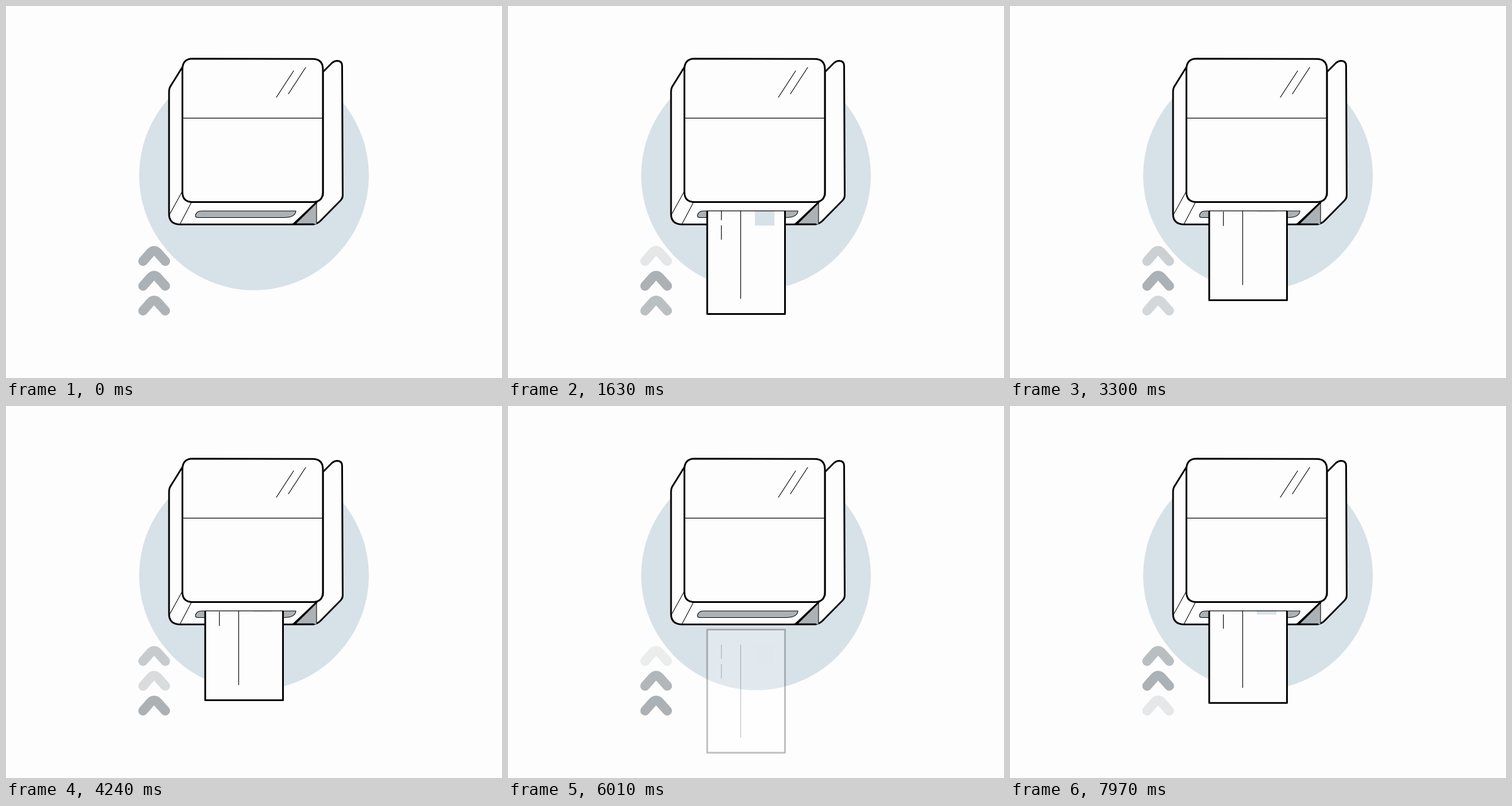
An HTML page with a canvas for the animation above (8 s loop, 864 by 648 pixels).

```html
<!DOCTYPE html>
<html lang="en">
<head>
<meta charset="utf-8">
<title>Paper feed</title>
<style>
  html, body { margin: 0; width: 100%; height: 100%; overflow: hidden; background: #fdfdfd; }
  canvas { display: block; }
</style>
</head>
<body>
<canvas id="stage" width="864" height="648"></canvas>
<script>
const ctx = document.getElementById('stage').getContext('2d');
const LOOP = 8000;
const WHITE = '#fdfdfd', BLACK = '#000', GRAY = '#abb1b4', BLUE = '#d7e1e8';

const FEED = { cycle: 5860, start: 761, span: 1725, from: 604, to: 512.6 };
const PULSE = { period: 1520, half: 562, first: 493, low: 0.2 };

const clamp = v => Math.min(1, Math.max(0, v));
const smooth = v => v * v * (3 - 2 * v);

// Cubic bezier easing with handles (x1, 0) and (x2, 1).
function ease(x, x1, x2) {
  let lo = 0, hi = 1;
  for (let i = 0; i < 24; i++) {
    const s = (lo + hi) / 2, r = 1 - s;
    if (3 * x1 * s * r * r + 3 * x2 * s * s * r + s * s * s < x) lo = s;
    else hi = s;
  }
  return smooth(lo);
}

function shape(d, fill, stroke, width) {
  const path = new Path2D(d);
  if (fill) { ctx.fillStyle = fill; ctx.fill(path); }
  if (stroke) { ctx.strokeStyle = stroke; ctx.lineWidth = width; ctx.stroke(path); }
}
const line = (d, width) => shape(d, null, BLACK, width);

function drawMachine() {
  // right panel
  shape('M552 115 L568 99 Q572 95.5 577 95.5 Q585.5 96 585.5 104 L586.5 330 Q586.5 335 583 338.5 ' +
    'L547.5 374.5 Q542 380 534 380 L500 380 L552 330 Z', WHITE, BLACK, 3);
  // body: left side and underside
  shape('M307.5 106 L287 139 Q284 143 284 150 L284 362 Q284 380 303 380.5 L500 380.5 ' +
    'L541 342 L541 110 Z', WHITE, BLACK, 3);
  shape('M541 342 L541 380 L502 380 Z', GRAY);
  line('M541 341 V379', 1.1);
  line('M541 342 L503 379.5 M498 380.3 H536', 3);
  line('M307 323 L285 363 M323 342 L303 380', 1.1);
  // slot
  shape('M341 357 H505 Q504 368.5 484 368.5 H335 Q330 368.5 330 365.5 Q331 357 341 357 Z',
    GRAY, BLACK, 1.1);
  // front face
  shape('M325 91.7 L534 92.3 Q552 92.5 552 110 L552 324 Q552 341.5 534 341.5 L325 341.5 ' +
    'Q307.3 341.5 307.3 324 L307.3 109 Q308 92 325 91.7 Z', WHITE, BLACK, 3);
  line('M308 195.4 H551', 1.1);
  line('M501 113 L471 159 M522 107 L492 153', 1.2);
}

function drawPaper(t) {
  const u = t % FEED.cycle;
  const alpha = clamp((u - 60) / 360) * clamp((5660 - u) / 360);
  if (alpha <= 0) return;
  const p = ease(clamp((u - FEED.start) / FEED.span), 0.05, 0.45);
  const bottom = FEED.from + (FEED.to - FEED.from) * p;

  ctx.save();
  ctx.globalAlpha = alpha;
  ctx.beginPath();
  ctx.rect(330, 357, 170, 291);
  ctx.clip();
  ctx.translate(0, bottom);
  shape('M347 -214.5 H482.5 V0 H347 Z', WHITE, BLACK, 3);
  shape('M430 -188 h34 v34 h-34 Z', BLUE);
  line('M371.7 -188 v24 M371.7 -154 v24 M405.3 -188 V-27', 1.2);
  ctx.restore();

  // slot edge in front of the inserted sheet
  if (bottom - 214.5 < 357) {
    ctx.globalAlpha = alpha;
    line('M347 357 H482.5', 1.1);
    ctx.globalAlpha = 1;
  }
}

// Arrows dim one after another, from the bottom up.
function arrowAlpha(t, order) {
  const first = PULSE.first + order * PULSE.period / 3;
  const n = Math.max(0, Math.round((t - first) / PULSE.period));
  const gap = Math.abs(t - first - n * PULSE.period);
  return PULSE.low + (1 - PULSE.low) * smooth(clamp(gap / PULSE.half));
}

function drawArrows(t) {
  for (let order = 0; order < 3; order++) {
    ctx.save();
    ctx.globalAlpha = arrowAlpha(t, order);
    ctx.translate(0, (2 - order) * 43.2);
    shape('M238.7 444.5 L251 430.5 Q258 422 265 430.5 L277.5 444.5', null, GRAY, 16.5);
    ctx.restore();
  }
}

function draw(t) {
  ctx.globalAlpha = 1;
  ctx.lineCap = ctx.lineJoin = 'round';
  ctx.fillStyle = WHITE;
  ctx.fillRect(0, 0, 864, 648);
  ctx.fillStyle = BLUE;
  ctx.beginPath();
  ctx.arc(432, 295, 200, 0, Math.PI * 2);
  ctx.fill();
  drawMachine();
  drawPaper(t);
  drawArrows(t);
}

const begin = performance.now();
function tick() {
  draw((performance.now() - begin) % LOOP);
  requestAnimationFrame(tick);
}
tick();
</script>
</body>
</html>
```
